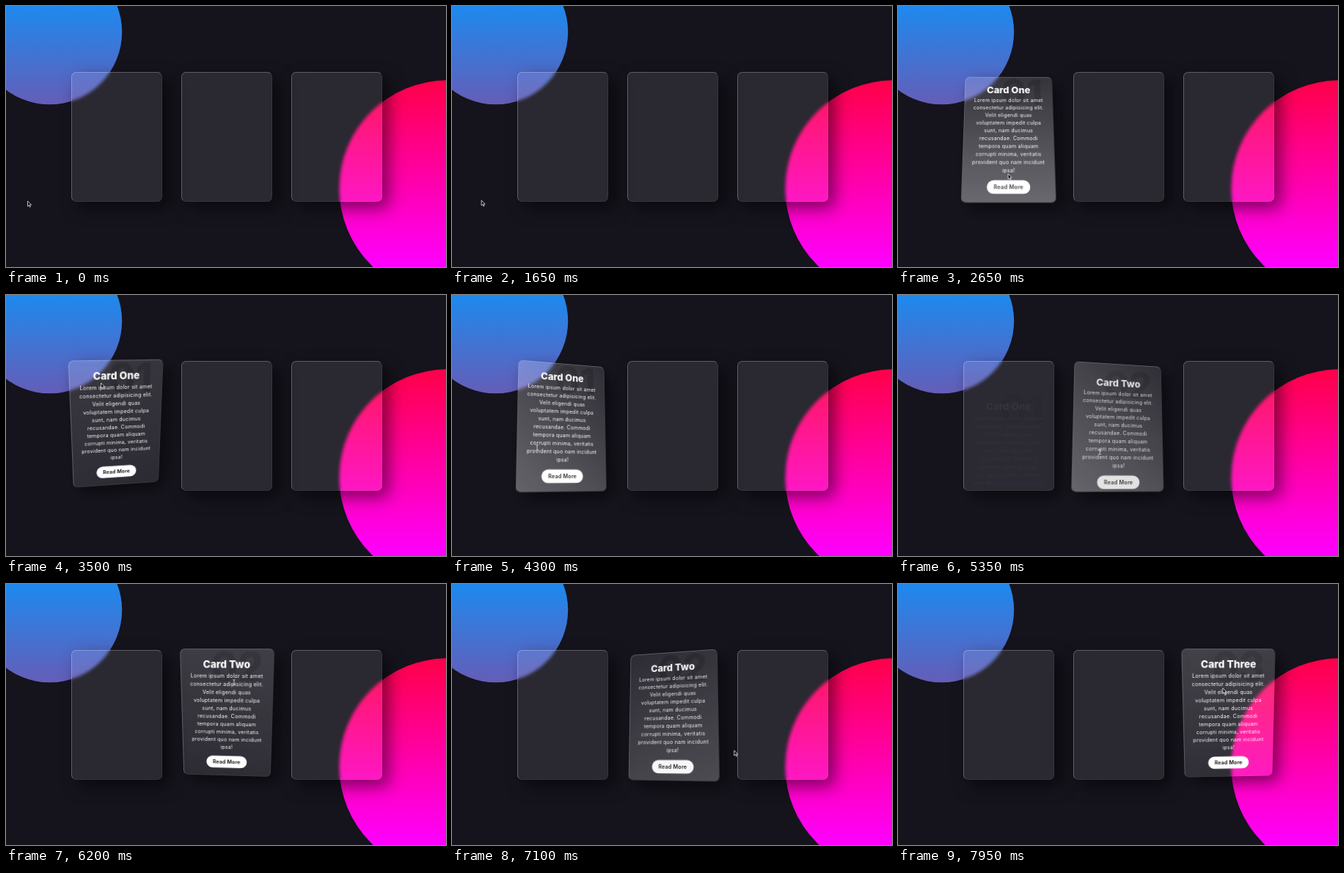
Recreate the animation shown at these times as an HTML page. Size 600 px wide and 356 px high, loop 8 s.

```html
<!DOCTYPE html>
<html lang="en">
<head>
<meta charset="utf-8">
<title>Tilting glass cards</title>
<style>
html, body { margin: 0; width: 100%; height: 100%; overflow: hidden; background: #15131c; }
#stage { position: absolute; left: 0; top: 0; width: 600px; height: 356px; overflow: hidden; background: #15131c; }
.disc { position: absolute; inset: 0; }
.pink { background: linear-gradient(#f00, #f0f); clip-path: circle(147.5px at 602px 248.8px); }
.blue { background: linear-gradient(#1e89ee, #d8165e); clip-path: circle(98.7px at 59.5px 35.6px); }
.card {
  position: absolute; top: 90px; width: 123.5px; height: 176.5px; box-sizing: border-box;
  border: 1px solid rgba(255,255,255,.07);
  border-top-color: rgba(255,255,255,.25); border-left-color: rgba(255,255,255,.25);
  border-radius: 6.6px; background: rgba(255,255,255,.09);
  box-shadow: 8.8px 8.8px 22px rgba(0,0,0,.5);
  backdrop-filter: blur(2.2px); overflow: hidden;
}
.card svg { position: absolute; left: -1px; top: -1px; overflow: visible; }
.wrap { position: absolute; inset: -1px; overflow: hidden; border-radius: 6.6px; }
.glare {
  position: absolute; left: 50%; top: 50%; width: 247px; height: 247px; transform-origin: 0 0;
  background: linear-gradient(0deg, rgba(255,255,255,0), #fff);
}
text { font-family: Inter, "Open Sans", sans-serif; text-anchor: middle; fill: #fff; }
.num { font-size: 52px; font-weight: 800; text-anchor: end; fill: #000; fill-opacity: .2; }
.title { font-size: 13.4px; font-weight: 800; }
.line { font-size: 7.1px; font-weight: 400; letter-spacing: .22px; }
.btn { font-size: 7.2px; font-weight: 600; letter-spacing: .2px; fill: #000; }
#cursor { position: absolute; left: 0; top: 0; overflow: visible; }
</style>
</head>
<body>
<div id="stage">
  <div class="disc pink"></div>
  <div class="disc blue"></div>
  <svg id="cursor" width="10" height="10">
    <path id="arrow" d="M0 0V7.2L1.7 5.7L2.8 8.2L4 7.7L2.9 5.2H5.1Z" fill="#111" stroke="#fff" stroke-width=".7"/>
    <path id="beam" d="M-1.6 -3.5Q0 -3.5 0 -2.5Q0 -3.5 1.6 -3.5M0 -2.5V2.5M-1.6 3.5Q0 3.5 0 2.5Q0 3.5 1.6 3.5" fill="none" stroke="#e4e4e8" stroke-width=".8"/>
  </svg>
</div>
<script>
const LOOP = 8000, W = 123.5, H = 176.5, TOP = 90, MAX = 25;
const LINES = ["Lorem ipsum dolor sit amet", "consectetur adipisicing elit.", "Velit eligendi quas",
  "voluptatem impedit culpa", "sunt, nam ducimus", "recusandae. Commodi", "tempora quam aliquam",
  "corrupti minima, veritatis", "provident quo nam incidunt", "ipsa!"];

// Pointer path: time, x, y
const PATH = [
  [1450, 29.5, 266], [1650, 40, 265], [2000, 89, 250], [2350, 139, 237], [2650, 150, 229],
  [2950, 182, 200], [3250, 165, 135], [3600, 118, 122], [3950, 105, 165], [4300, 116, 208],
  [4650, 160, 220], [4980, 213, 222], [5090, 239, 220], [5350, 275, 214], [5700, 322, 220],
  [6000, 335, 165], [6300, 297, 128], [6600, 265, 165], [6850, 300, 225], [7070, 363, 231],
  [7100, 384.5, 227], [7350, 440, 205], [7600, 474, 155], [7950, 443, 142], [8000, 440, 142]
];

const cards = [
  { name: "One", left: 89, enter: 2000, leave: 4980 },
  { name: "Two", left: 239, enter: 5090, leave: 7070 },
  { name: "Three", left: 389, enter: 7120, leave: Infinity }
];

const $ = id => document.getElementById(id);
const clamp = v => Math.min(1, Math.max(0, v));

function bezier(x1, y1, x2, y2) {
  const at = (a, b, s) => 3 * (1 - s) * (1 - s) * s * a + 3 * (1 - s) * s * s * b + s * s * s;
  return x => {
    x = clamp(x);
    if (x === 0 || x === 1) return x;
    let lo = 0, hi = 1;
    for (let i = 0; i < 24; i++) {
      const mid = (lo + hi) / 2;
      if (at(x1, x2, mid) < x) lo = mid; else hi = mid;
    }
    return at(y1, y2, lo);
  };
}
const ease = bezier(.25, .1, .25, 1);
const snap = bezier(.03, .98, .52, .99);

// Smooth curve through the path points
function pointer(t) {
  t = Math.max(t, PATH[0][0]);
  let i = 0;
  while (i < PATH.length - 2 && t >= PATH[i + 1][0]) i++;
  const a = PATH[i], b = PATH[i + 1], span = b[0] - a[0], u = (t - a[0]) / span;
  const slope = (k, n) => {
    const p = PATH[Math.max(k - 1, 0)], q = PATH[Math.min(k + 1, PATH.length - 1)];
    return (q[n] - p[n]) / (q[0] - p[0]) * span;
  };
  const axis = n => {
    const u2 = u * u, u3 = u2 * u;
    return (2 * u3 - 3 * u2 + 1) * a[n] + (u3 - 2 * u2 + u) * slope(i, n)
      + (3 * u2 - 2 * u3) * b[n] + (u3 - u2) * slope(i + 1, n);
  };
  return { x: axis(1), y: axis(2) };
}

cards.forEach((card, i) => {
  const mid = W / 2;
  const el = document.createElement("div");
  el.className = "card";
  el.style.left = card.left + "px";
  el.innerHTML = `<svg width="${W}" height="${H}"><g>
    <text class="num" x="110" y="41.5">0${i + 1}</text>
    <text class="title" x="${mid}" y="25">Card ${card.name}</text>
    ${LINES.map((s, n) => `<text class="line" x="${mid}" y="${38.5 + n * 11}">${s}</text>`).join("")}
    <rect x="${mid - 28.5}" y="147.6" width="57" height="17.7" rx="8.85" fill="#fff"/>
    <text class="btn" x="${mid}" y="159">Read More</text>
  </g></svg><div class="wrap"><div class="glare"></div></div>`;
  $("stage").insertBefore(el, $("cursor"));
  card.el = el;
  card.body = el.querySelector("g");
  card.glare = el.querySelector(".glare");
});

function drawCard(card, t) {
  const { enter, leave, left } = card;
  const gone = t >= leave;
  const mix = (curve, ms) => gone ? 1 - curve((t - leave) / ms) : curve((t - enter) / ms);
  const tilt = mix(snap, 400), shown = mix(ease, 500);
  const p = pointer(Math.min(Math.max(t, enter), leave));
  const px = clamp((p.x - left) / W), py = clamp((p.y - TOP) / H);
  const rx = (py * 2 - 1) * MAX * tilt, ry = (1 - px * 2) * MAX * tilt;
  const angle = Math.atan2(p.x - left - W / 2, TOP + H / 2 - p.y) * 180 / Math.PI;
  card.el.style.transform = `perspective(441px) rotateX(${rx}deg) rotateY(${ry}deg)`;
  card.glare.style.transform = `rotate(${180 + (angle - 180) * tilt}deg) translate(-50%, -50%)`;
  card.glare.style.opacity = py * .44 * tilt;
  card.body.setAttribute("transform", `translate(0 ${44.1 * (1 - shown)})`);
  card.body.setAttribute("opacity", shown);
}

function draw(t) {
  cards.forEach(card => drawCard(card, t));
  const p = pointer(t);
  const onText = t > 2900 && t < 6900 && cards.some(c => t >= c.enter && t < c.leave
    && Math.abs(p.x - c.left - W / 2) < 49 && p.y > 120 && p.y < 230);
  $("cursor").style.transform = `translate(${p.x}px, ${p.y}px)`;
  $("arrow").style.display = onText ? "none" : "";
  $("beam").style.display = onText ? "" : "none";
}

const start = performance.now();
function tick() {
  draw((performance.now() - start) % LOOP);
  requestAnimationFrame(tick);
}
tick();
</script>
</body>
</html>
```
